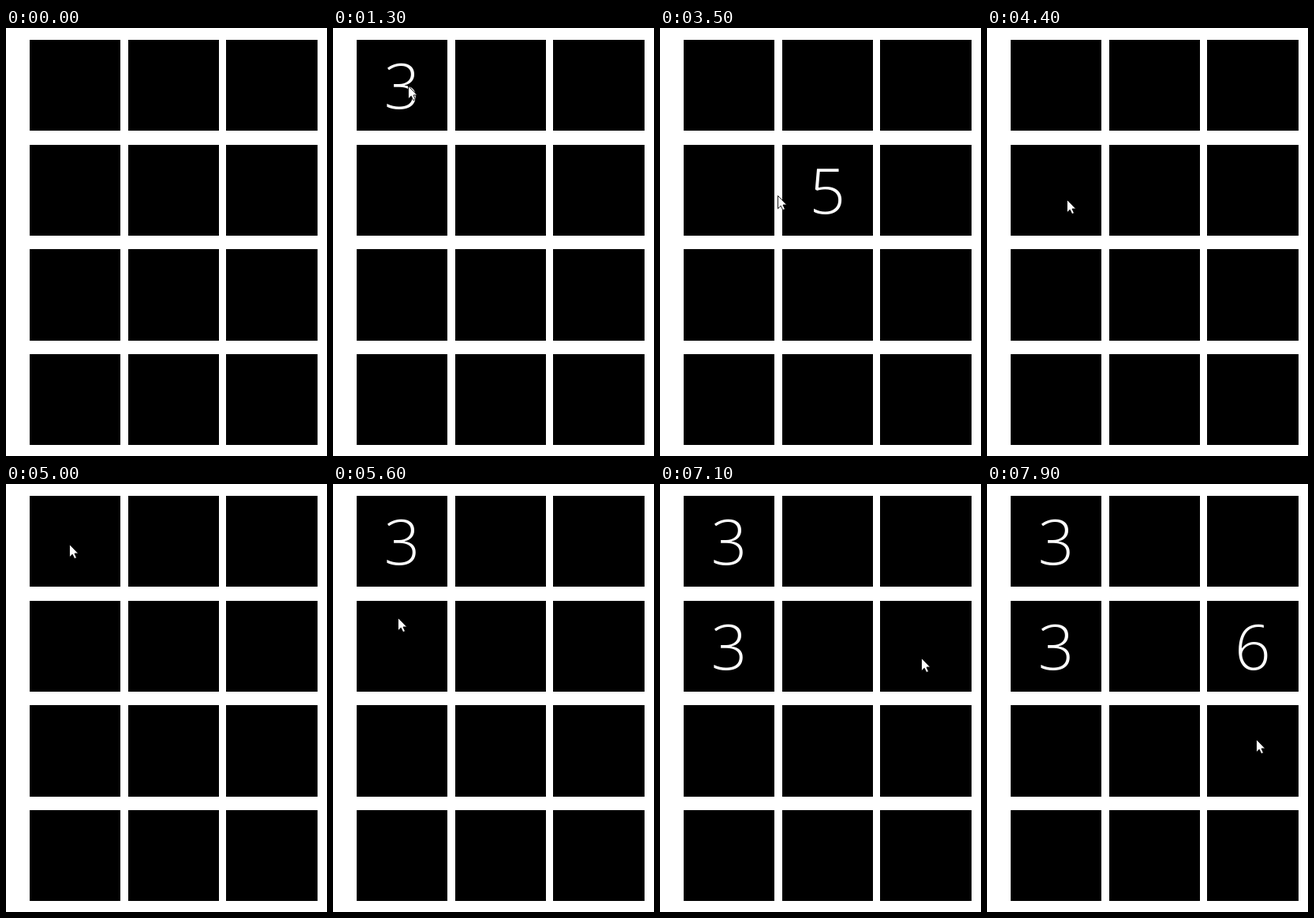
Write an HTML page that moves like this. It is 407 px wide and 542 px high and loops after 8 s.

```html
<!DOCTYPE html>
<html lang="en">
<head>
<meta charset="utf-8">
<title>Memory game</title>
<style>
  html, body { margin: 0; width: 100%; height: 100%; overflow: hidden; background: #fff; }
  svg { display: block; width: 100%; height: 100%; }
  rect { shape-rendering: crispEdges; }
  text { font: 300 80px "Open Sans", "Noto Sans", sans-serif; fill: #fff; text-anchor: middle; }
</style>
</head>
<body>
<svg viewBox="0 0 407 542">
  <g id="board"></g>
  <path id="cursor" d="M.5 .4V16.8L4.2 13.2L6.8 18.6L9.5 17.4L7 12H11.7Z" fill="#fff" stroke="#000" stroke-width=".9"/>
</svg>
<script>
const LOOP = 8000;
const STEP = 100;
const CARD = 115.4;
const GAP_X = 9.2;
const GAP_Y = 17.2;
const PEEK = 450; // how long an unequal pair stays open

const DECK = [..."314356254612"];

// Time of each click and the card it opens; two clicks make a turn
const CLICKS = [
  [1300, 0], [2050, 1],
  [3400, 4], [3900, 3],
  [5400, 0], [6000, 3],
  [7600, 5]
];

// Pointer stops: arrival time, x, y
const STOPS = [
  [300, 27, 2], [700, 95, 73], [1700, 222, 73], [3100, 209, 206],
  [3700, 101, 217], [4700, 90, 120], [5000, 80, 76], [5800, 82, 200],
  [6700, 99, 202], [7100, 331, 220], [7900, 341, 323]
];

const board = document.getElementById("board");
const cursor = document.getElementById("cursor");

function add(tag, attrs) {
  const el = document.createElementNS("http://www.w3.org/2000/svg", tag);
  for (const key in attrs) el.setAttribute(key, attrs[key]);
  return board.appendChild(el);
}

function addCard(digit, i) {
  const left = 30 + (i % 3) * (CARD + GAP_X);
  const top = 15 + Math.floor(i / 3) * (CARD + GAP_Y);
  const x = Math.round(left);
  const y = Math.round(top);
  add("rect", {
    x, y,
    width: Math.round(left + CARD) - x,
    height: Math.round(top + CARD) - y
  });
  const label = add("text", { x: left + CARD / 2, y: y + 87.3 });
  label.textContent = digit;
  return label;
}

const labels = DECK.map(addCard);

// The cards lying open at time t
function openCards(t) {
  const open = new Set();
  for (let i = 0; i < CLICKS.length; i += 2) {
    const turn = CLICKS.slice(i, i + 2);
    const [first, second] = turn.map(click => click[1]);
    const equal = DECK[first] === DECK[second];
    const closing = turn[1] && !equal ? turn[1][0] + PEEK : LOOP;
    for (const [time, card] of turn) {
      if (t >= time && t < closing) open.add(card);
    }
  }
  return open;
}

const easeOut = p => 1 - (1 - p) ** 2;

// Longer ways take more steps, up to four
const travelTime = dist => STEP * Math.min(4, Math.round(1 + dist / 48));

function pointerAt(t) {
  let [, x, y] = STOPS[0];
  for (const [arrival, toX, toY] of STOPS.slice(1)) {
    const dx = toX - x;
    const dy = toY - y;
    const span = travelTime(Math.hypot(dx, dy));
    const p = 1 - (arrival - t) / span;
    if (p <= 0) break;
    x += dx * easeOut(Math.min(1, p));
    y += dy * easeOut(Math.min(1, p));
  }
  return [Math.round(x), Math.round(y)];
}

function show(el, on) {
  el.setAttribute("visibility", on ? "visible" : "hidden");
}

function draw(ms) {
  const t = Math.floor((ms % LOOP) / STEP) * STEP;
  const open = openCards(t);
  labels.forEach((label, i) => show(label, open.has(i)));
  show(cursor, t >= STOPS[0][0]);
  cursor.setAttribute("transform", `translate(${pointerAt(t)})`);
}

const began = performance.now();
function tick() {
  draw(performance.now() - began);
  requestAnimationFrame(tick);
}
tick();
</script>
</body>
</html>
```
